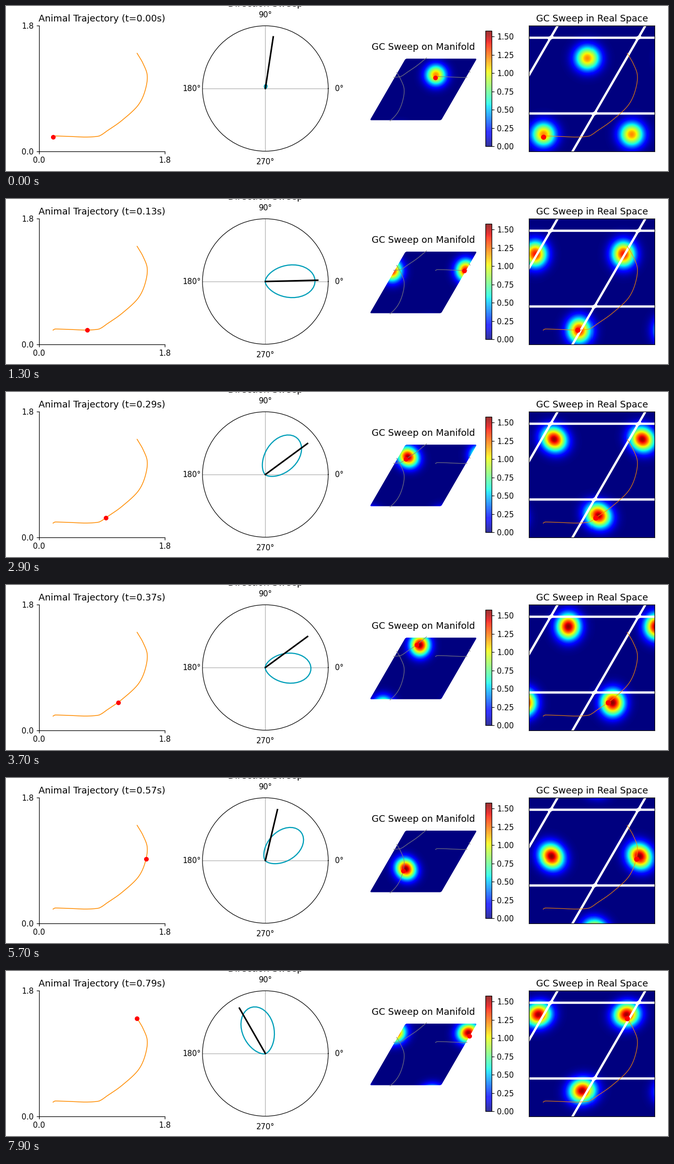
Write a matplotlib script that moves like this. It is 1280 px wide and 320 px high and loops after 8000 ms.

```python
import numpy as np
import matplotlib.pyplot as plt
from matplotlib.animation import FuncAnimation
from matplotlib.cm import ScalarMappable
from matplotlib.colors import Normalize
from matplotlib.path import Path

W, H = 1280, 320
FRAMES, INTERVAL = 80, 100
TOP, BOTTOM = 0.12 * H, 0.88 * H
SIDE = BOTTOM - TOP                   # all large panels are square
PERIOD = 169.65                       # grid spacing in pixels
ROW = PERIOD * np.sqrt(3) / 2
CELL = np.array([1095.5, 135.0])      # centre of one cell in real space
SHEET = np.array([807.0, 161.8])      # centre of the manifold
ZOOM = 0.838                          # manifold size relative to a real cell
SHIFT = 947.7                         # from trajectory panel to real space panel
VMAX = 1.577
THETA = 10                            # steps per theta cycle

# the walk: step, x, y
WALK = np.array([
    (0, 91, 254.3), (1, 94, 252.4), (2.5, 101, 252.3), (13, 157, 254.2),
    (18, 175.5, 253), (24, 184.2, 250.1), (30, 194.7, 242.7), (39, 223.8, 222.2),
    (48, 256.3, 191.3), (57, 270.8, 157), (64, 272.8, 132.3), (70, 266, 113.6),
    (79, 253.5, 91.7),
])


def walk(t):
    """Position on a cubic Hermite curve through the walk points."""
    ts, pts = WALK[:, 0], WALK[:, 1:].T
    slope = np.gradient(pts, ts, axis=1)
    i = np.clip(np.searchsorted(ts, t, side="right") - 1, 0, len(ts) - 2)
    h = ts[i + 1] - ts[i]
    s = (t - ts[i]) / h
    return ((1 + 2 * s) * (1 - s) ** 2 * pts[:, i]
            + s * (1 - s) ** 2 * h * slope[:, i]
            + s * s * (3 - 2 * s) * pts[:, i + 1]
            + s * s * (s - 1) * h * slope[:, i + 1])


def heading(n):
    """Direction of travel, after a short turn at the start."""
    dx, dy = walk(n + 0.01) - walk(n - 0.01)
    return np.arctan2(-dy, dx) + np.radians(49) * np.exp(-2 * n)


def sweep(n):
    """Heading, swept direction and lobe length; sides alternate each cycle."""
    cycle, step = divmod(n, THETA)
    side = 1 if cycle % 2 == 0 else -1
    share = np.exp(-((step / THETA - 0.69) / 0.2) ** 2)
    head = heading(n)
    size = (0.95 - 0.08 * share) * (1 - 0.92 * np.exp(-n / 1.5))
    return head, head + side * np.radians(38) * share, size


def bump(n):
    """Centre and height of the grid cell activity, pulsing with theta."""
    pulse = np.cos(2 * np.pi * (n / THETA - 0.75))
    angle = sweep(n)[1]
    reach = 5.8 + 2.2 * pulse
    x, y = walk(n)
    height = 1.48 + 0.08 * pulse - 0.28 * np.exp(-n / 3)
    return x + SHIFT + reach * np.cos(angle), y - reach * np.sin(angle), height


def lattice(u, v):
    return u * PERIOD + v * PERIOD / 2, -v * ROW


def wrap(dx, dy):
    """Shortest lattice offset equal to (dx, dy)."""
    v = -dy / ROW
    u = dx / PERIOD - v / 2
    return lattice(u - np.round(u), v - np.round(v))


def to_sheet(x, y):
    dx, dy = wrap(x - CELL[0], y - CELL[1])
    return SHEET[0] + ZOOM * dx, SHEET[1] + ZOOM * dy


def activity(n, x, y):
    """Periodic bump, a little wider across the sweep than along it."""
    cx, cy, height = bump(n)
    dx, dy = wrap(x - cx, y - cy)
    angle = sweep(n)[1]
    grow = 1 - np.exp(-n / 3)
    along, across = 16 - 0.7 * grow, 16 + grow
    total = 0
    for u in (-1, 0, 1):
        for v in (-1, 0, 1):
            ox, oy = lattice(u, v)
            px, py = dx + ox, -(dy + oy)
            a = px * np.cos(angle) + py * np.sin(angle)
            b = py * np.cos(angle) - px * np.sin(angle)
            total = total + np.exp(-(a / along) ** 2 / 2 - (b / across) ** 2 / 2)
    return height * total


def cell_path(center, zoom=1.0, fill=0.97, cut=0.02):
    """Parallelogram with slightly rounded corners."""
    k = fill / 2
    pts = [center + zoom * np.array(lattice(u, v))
           for u, v in [(-k, k), (k, k), (k, -k), (-k, -k)]]
    verts, codes = [], []
    for i, c in enumerate(pts):
        before, after = pts[i - 1], pts[(i + 1) % 4]
        verts += [c + (before - c) * cut, c, c + (after - c) * cut]
        codes += [Path.LINETO, Path.CURVE3, Path.CURVE3]
    codes[0] = Path.MOVETO
    return Path(verts + [verts[0]], codes + [Path.CLOSEPOLY])


fig = plt.figure(figsize=(12, 3), dpi=320 / 3, facecolor="white")


def box(left, top, right, bottom):
    return [left / W, 1 - bottom / H, (right - left) / W, (bottom - top) / H]


def panel(left, top, right, bottom):
    """Axes whose data units are stage pixels, y pointing down."""
    ax = fig.add_axes(box(left, top, right, bottom))
    ax.set(xlim=(left, right), ylim=(bottom, top))
    return ax


def heat(ax, bounds, clip):
    """Empty heat map and the pixel centres it samples."""
    left, top, right, bottom = bounds
    cols, rows = round(right - left), round(bottom - top)
    img = ax.imshow(np.zeros((rows, cols)), cmap="jet", vmin=0, vmax=VMAX,
                    extent=(left, right, bottom, top), aspect="auto",
                    interpolation="nearest")
    img.set_clip_path(clip, ax.transData)
    xs = left + (np.arange(cols) + 0.5) * (right - left) / cols
    ys = top + (np.arange(rows) + 0.5) * (bottom - top) / rows
    return img, *np.meshgrid(xs, ys)


def dot(ax, size):
    return ax.plot([], [], "o", color="red", ms=size * 0.675, mew=0,
                   clip_on=False, zorder=5)[0]


def label(x, y, text):
    fig.text(x / W, 1 - y / H, text, fontsize=12, ha="center", va="baseline")


track_x, track_y = walk(np.linspace(0, FRAMES - 1, 500))

# trajectory
ax_track = panel(64, TOP, 64 + SIDE, BOTTOM)
ax_track.spines[["top", "right"]].set_visible(False)
ax_track.set_xticks([64, 64 + SIDE], ["0.0", "1.8"])
ax_track.set_yticks([BOTTOM, TOP], ["0.0", "1.8"])
ax_track.plot(track_x, track_y, color="darkorange", lw=1)
track_title = ax_track.set_title("")
track_dot = dot(ax_track, 9)

# direction
ax_dir = fig.add_axes(box(501.5 - SIDE / 2, TOP, 501.5 + SIDE / 2, BOTTOM),
                      projection="polar")
theta = np.linspace(-np.pi, np.pi, 100, endpoint=False)
lobe, = ax_dir.plot(theta, np.zeros(100), color="#009FB9", lw=1.5)
needle, = ax_dir.plot([0, 0], [0, 1], color="black", lw=2)
ax_dir.set_ylim(0, 1.2)
ax_dir.set_yticks([])
ax_dir.set_xticks(np.arange(4) * np.pi / 2)
label(501.5, 1.3, "Direction Sweep")

# manifold
sheet_box = (695, 90, 919, 232)
ax_sheet = panel(*sheet_box)
ax_sheet.axis("off")
sheet_img, mx, my = heat(ax_sheet, sheet_box, cell_path(SHEET, ZOOM))
sheet_x = CELL[0] + (mx - SHEET[0]) / ZOOM
sheet_y = CELL[1] + (my - SHEET[1]) / ZOOM
sx, sy = to_sheet(track_x + SHIFT, track_y)
jumps = np.flatnonzero(np.hypot(np.diff(sx), np.diff(sy)) > 40) + 1
ax_sheet.plot(np.insert(sx, jumps, np.nan), np.insert(sy, jumps, np.nan),
              color="gray", alpha=0.8, lw=0.9)
sheet_dot = dot(ax_sheet, 9)
label(807, 84.8, "GC Sweep on Manifold")

# colour scale
fig.colorbar(ScalarMappable(Normalize(0, VMAX), "jet"),
             cax=fig.add_axes(box(927.4, 48.2, 938.7, 272.2)),
             alpha=0.8, ticks=np.arange(0, 1.6, 0.25))

# real space
real_box = (1254.4 - SIDE, TOP, 1254.4, BOTTOM)
ax_real = panel(*real_box)
ax_real.set(xticks=[], yticks=[])
cells = [cell_path(CELL + np.array(lattice(u, v)))
         for u in range(-2, 3) for v in range(-1, 2)]
real_img, real_x, real_y = heat(ax_real, real_box, Path.make_compound_path(*cells))
ax_real.plot(track_x + SHIFT, track_y, color="darkorange", alpha=0.8, lw=0.9)
real_dot = dot(ax_real, 10)
ax_real.set_title("GC Sweep in Real Space")


def draw(n):
    x, y = walk(n)
    track_title.set_text(f"Animal Trajectory (t={n / 100:.2f}s)")
    track_dot.set_data([x], [y])
    real_dot.set_data([x + SHIFT], [y])
    px, py = to_sheet(x + SHIFT, y)
    sheet_dot.set_data([px], [py])

    head, angle, size = sweep(n)
    gap = (theta - angle + np.pi) % (2 * np.pi) - np.pi
    lobe.set_data(theta, size * np.exp(-(gap / 0.575) ** 2 / 2))
    needle.set_data([head, head], [0, 1])

    real_img.set_data(activity(n, real_x, real_y))
    sheet_img.set_data(activity(n, sheet_x, sheet_y))
    return track_title, track_dot, real_dot, sheet_dot, lobe, needle, real_img, sheet_img


anim = FuncAnimation(fig, draw, frames=FRAMES, interval=INTERVAL,
                     repeat=True, repeat_delay=0, blit=False)
plt.show()
```
